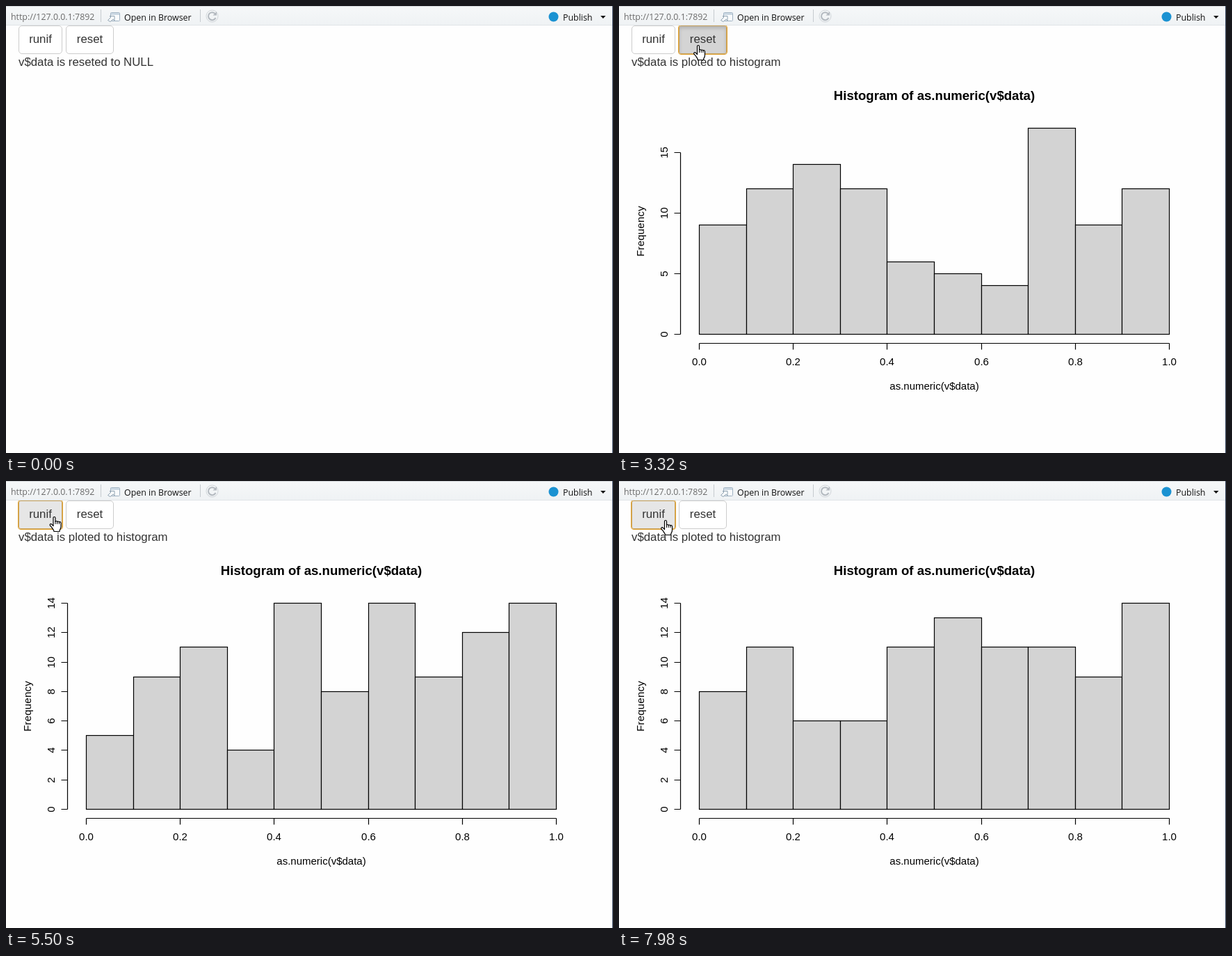
These frames come from a looping animation (873x642 px, 8000 ms). An HTML page:

```html
<!DOCTYPE html>
<html lang="en">
<head>
<meta charset="utf-8">
<title>Shiny reset demo</title>
<style>
html, body { margin: 0; width: 100%; height: 100%; overflow: hidden; background: #fefefe; }
#stage { position: relative; width: 873px; height: 642px; overflow: hidden; }
svg { position: absolute; left: 0; top: 0; }
text { font-family: "Liberation Sans", Arial, sans-serif; white-space: pre; }
.bar text { font-family: "Open Sans", "Noto Sans", sans-serif; font-size: 12.4px; fill: #111; }
.btn {
  position: absolute; top: 28px; height: 41px; box-sizing: border-box;
  border: 1px solid #ccc; border-radius: 5px; background: #fff; color: #333;
  font: 16.8px/38px "Liberation Sans", Arial, sans-serif; text-align: center;
}
#runif { left: 18px; width: 63px; }
#reset { left: 86px; width: 69px; }
.hover { background: #e6e6e6; border-color: #adadad; }
.focus, .active { background: #e6e6e6; border-color: #c8a15a; border-radius: 3px; outline: 1px solid #e0a335; }
.active { background: #d4d4d4; box-shadow: inset 0 3px 5px rgba(0, 0, 0, .16); }
.plot text { font-size: 15px; text-anchor: middle; }
.plot .title { font-size: 18.6px; font-weight: bold; }
.plot path, .plot rect { stroke: #000; stroke-width: 1.2; fill: none; }
.plot rect { fill: #d3d3d3; }
</style>
</head>
<body>
<div id="stage">
  <div class="btn" id="runif">runif</div>
  <div class="btn" id="reset">reset</div>
  <svg id="page" width="873" height="642">
    <text id="status" x="18" y="86" font-size="16.8" fill="#333"></text>
  </svg>
  <svg class="bar" width="873" height="642">
    <defs>
      <linearGradient id="shade" x2="0" y2="1">
        <stop stop-color="#f6f8f9"/><stop offset="1" stop-color="#eff2f4"/>
      </linearGradient>
    </defs>
    <rect width="873" height="28" fill="url(#shade)"/>
    <path d="M0 .5H873" stroke="#d3d7da"/>
    <path d="M0 27.5H873" stroke="#e0e4e7"/>
    <path d="M136.5 5V23M279.5 5V23" stroke="#c6cbcf"/>
    <text x="7" y="20" style="fill:#6c6c6c">http://127.0.0.1:7892</text>
    <g fill="#f9fbfc" stroke="#9fb2c2">
      <rect x="150.5" y="9.5" width="13" height="12" rx="1"/>
      <path d="M151 11.5H163" stroke="#b9cad8" stroke-width="2"/>
      <path d="M146.500 20.500L151 16L149 14.500H156V21L154 19L150 22.500Z" stroke="#8da0b0"/>
    </g>
    <text x="170" y="21">Open in Browser</text>
    <g fill="none" stroke="#b4bac0">
      <circle cx="296.500" cy="14.500" r="8.500" stroke="#d0d5d9"/>
      <path d="M301 11.500A5.500 5.500 0 1 0 301.500 17" stroke-width="2"/>
      <path d="M303 8V13.500H297.500Z" fill="#b4bac0" stroke="none"/>
    </g>
    <circle cx="787.500" cy="15.500" r="7" fill="#1b92d2"/>
    <text x="801" y="21">Publish</text>
    <path d="M855 14H862.500L858.750 18Z" fill="#111"/>
    <path d="M872.500 0V642" stroke="#35445e"/>
  </svg>
  <svg width="873" height="642">
    <g id="cursor" fill="#fff" stroke="#000" stroke-linejoin="round">
      <g id="hand">
        <path d="M5.500 2.200q0-1.700 1.500-1.700t1.500 1.700v5.300q0-1 1.300-1t1.400 1.400q.2-.9 1.300-.9t1.400 1.400q.2-.7 1.200-.7t1.400 1.800v5q0 2.200-1 3.700t-1 3.300h-8q0-1.500-1.300-3t-2-3.200L.9 13q-.7-1.600.4-2.200t2.400.8l1.800 2z" stroke-width="1.200"/>
        <path d="M8.500 7V11M11.200 7.800V11M13.900 8.400V11" fill="none"/>
      </g>
      <path id="arrow" d="M.5.500V16.500L4.200 13L6.700 18.500L9 17.500L6.600 12.200H11.800Z"/>
    </g>
  </svg>
</div>
<script>
const LOOP = 8000;
const $ = id => document.getElementById(id);

const counts = [
  [9, 12, 14, 12, 6, 5, 4, 17, 9, 12],
  [5, 9, 11, 4, 14, 8, 14, 9, 12, 14],
  [8, 11, 6, 6, 11, 13, 11, 11, 9, 14]
];

// time, x, y of the pointer's top left corner
const moves = [
  [2610, 102, 56], [2770, 107, 56], [3790, 80, 51], [3940, 45, 51], [4090, 44, 51],
  [5500, 62.5, 51], [5660, 88, 54], [5750, 97, 55], [5920, 100, 55], [6180, 104, 55],
  [6760, 92, 53], [6840, 76, 51], [6920, 62, 53], [7000, 57, 56], [7980, 60, 56]
];
// the pointer comes in from the bottom edge in nine steps
const entry = Array.from({ length: 9 }, (_, i) => {
  const u = i / 8, rise = 1 - (1 - u) ** 1.4;
  return [140 + 610 * u, 100 - 43 * u ** 1.6, 622 - 575.5 * rise];
});
const path = [[0, -40, -40], ...entry, ...moves];

// time, runif state, reset state, plot shown (0 = none)
const states = [
  [0, "", "", 0], [750, "hover", "", 0], [1550, "active", "", 0], [1740, "focus", "", 1],
  [2610, "focus", "hover", 1], [3230, "", "active", 1], [3410, "", "focus", 0],
  [3940, "hover", "focus", 0], [4410, "active", "", 0], [4570, "focus", "", 2],
  [5660, "focus", "hover", 2], [6090, "", "active", 2], [6270, "", "focus", 2],
  [6360, "", "focus", 0], [6840, "hover", "focus", 0], [7320, "focus", "", 0],
  [7490, "focus", "", 3]
];

const snap = v => Math.round(v - .5) + .5;
const label = (x, y, s, extra = "") => `<text x="${x}" y="${y}" ${extra}>${s}</text>`;
const upright = (x, y, s, extra = "") =>
  label(0, 0, s, `transform="translate(${x} ${y}) rotate(-90)" ${extra}`);

function histogram(bins) {
  const max = Math.max(...bins), step = max > 15 ? 5 : 2;
  const px = v => snap(115.5 + 676 * v);
  const py = v => snap(471.5 - 296 * v / max);
  let out = label(453.5, 135, "Histogram of as.numeric(v$data)", 'class="title"')
    + label(453.5, 551, "as.numeric(v$data)")
    + upright(36, 323.5, "Frequency", 'letter-spacing=".2"');
  bins.forEach((n, i) => {
    const x = px(i / 10), y = py(n);
    out += `<rect x="${x}" y="${y}" width="${px((i + 1) / 10) - x}" height="${471.5 - y}"/>`;
  });
  let axes = "M115.5 484.5H791.5";
  for (let i = 0; i <= 5; i++) {
    const x = px(i / 5);
    axes += `M${x} 484.5V493.5`;
    out += label(x, 516, (i / 5).toFixed(1));
  }
  const top = max - max % step;
  axes += `M88.5 471.5V${py(top)}`;
  for (let v = 0; v <= top; v += step) {
    axes += `M88.5 ${py(v)}H79.5`;
    out += upright(70, py(v), v);
  }
  const g = document.createElementNS("http://www.w3.org/2000/svg", "g");
  g.setAttribute("class", "plot");
  g.innerHTML = out + `<path d="${axes}"/>`;
  $("page").append(g);
  return g;
}

const plots = counts.map(histogram);
const at = (table, t) => table.findLast(row => row[0] <= t);
const show = (el, on) => el.style.display = on ? "" : "none";

function draw(t) {
  const [, x, y] = at(path, t);
  $("cursor").setAttribute("transform", `translate(${x} ${y})`);
  show($("hand"), y < 68);
  show($("arrow"), y >= 68);

  const [, runif, reset, plot] = at(states, t);
  $("runif").className = "btn " + runif;
  $("reset").className = "btn " + reset;
  $("status").textContent = plot ? "v$data is ploted to histogram" : "v$data is reseted to NULL";
  plots.forEach((g, i) => show(g, i + 1 === plot));
}

const start = performance.now();
function tick() {
  draw((performance.now() - start) % LOOP);
  requestAnimationFrame(tick);
}
tick();
</script>
</body>
</html>
```
